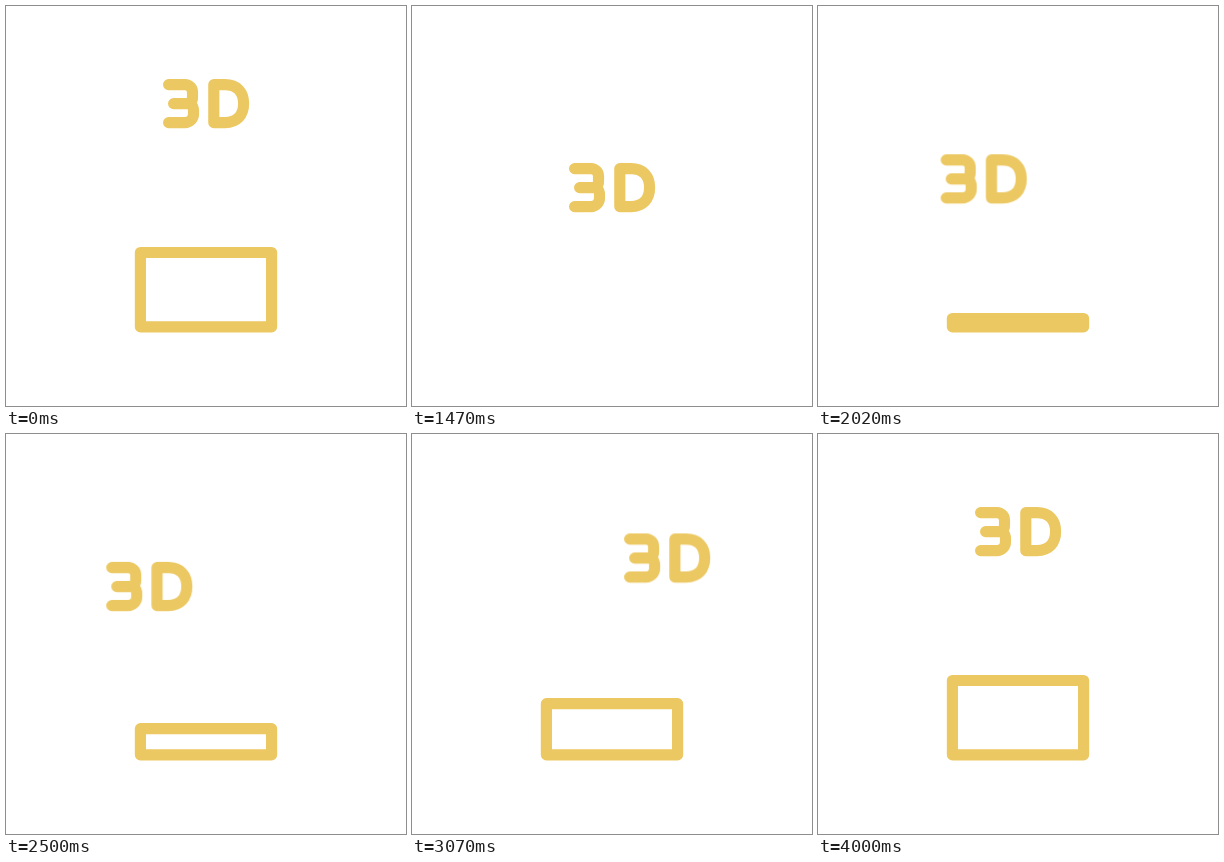
An HTML page for the animation above (4020 ms loop, 400 px wide and 400 px high).

```html
<!DOCTYPE html>
<html lang="en">
<head>
<meta charset="utf-8">
<title>3D printing</title>
<style>
  html, body { margin: 0; width: 100%; height: 100%; overflow: hidden; background: #fff; }
  svg { display: block; width: 100%; height: 100%; }
  g, rect {
    animation: 4020ms cubic-bezier(.333, 0, .667, 1) infinite;
  }
  .stroke {
    fill: none;
    stroke: #ecc862;
    stroke-width: 11.16;
    stroke-linecap: round;
    stroke-linejoin: round;
  }
  .lift { animation-name: lift; }
  .sweep { animation-name: sweep; }
  .slide { animation-name: slide; animation-timing-function: linear; }
  .grow { animation-name: grow; }

  /* the head drops, then rises with the printed box */
  @keyframes lift {
    0%, 24.876%, 99.502%, 100% { transform: translateY(0); }
    37.313% { transform: translateY(84.8px); }
  }
  @keyframes sweep {
    0%, 37.313%, 52.985%, 66.219%, 99.502%, 100% { transform: translateX(0); }
    42.289%, 79.726% { transform: translateX(65px); }
    47.761%, 61.07% { transform: translateX(-65px); }
  }
  /* the finished box leaves to the left, a new one starts in place */
  @keyframes slide {
    0%, 24.876% { transform: translateX(0); visibility: visible; }
    37.313% { transform: translateX(-290px); visibility: hidden; }
    37.314%, 38.3% { transform: translateX(0); visibility: hidden; }
    38.301%, 100% { transform: translateX(0); visibility: visible; }
  }
  @keyframes grow {
    0%, 37.312%, 99.502%, 100% { y: 246.5px; height: 74.4px; }
    37.313% { y: 320.89px; height: .01px; }
  }
</style>
</head>
<body>
<svg viewBox="0 0 400 400">
  <g class="lift">
    <g class="sweep">
      <path class="stroke" d="M162.6 78.6H179a7.5 7.5 0 0 1 7.5 7.5V91q0 6.6 -6 6.6H167.6
        M180.5 97.6q7 0 7 7V108a8.6 8.6 0 0 1 -8.6 8.6H162.6"/>
      <path class="stroke" d="M207.8 78.6H219C231 78.6 237.6 86 237.6 97.6S231 116.6 219 116.6H207.8Z"/>
    </g>
  </g>
  <g class="slide">
    <rect class="stroke grow" x="134.4" y="246.5" width="131.2" height="74.4"/>
  </g>
</svg>
</body>
</html>
```
